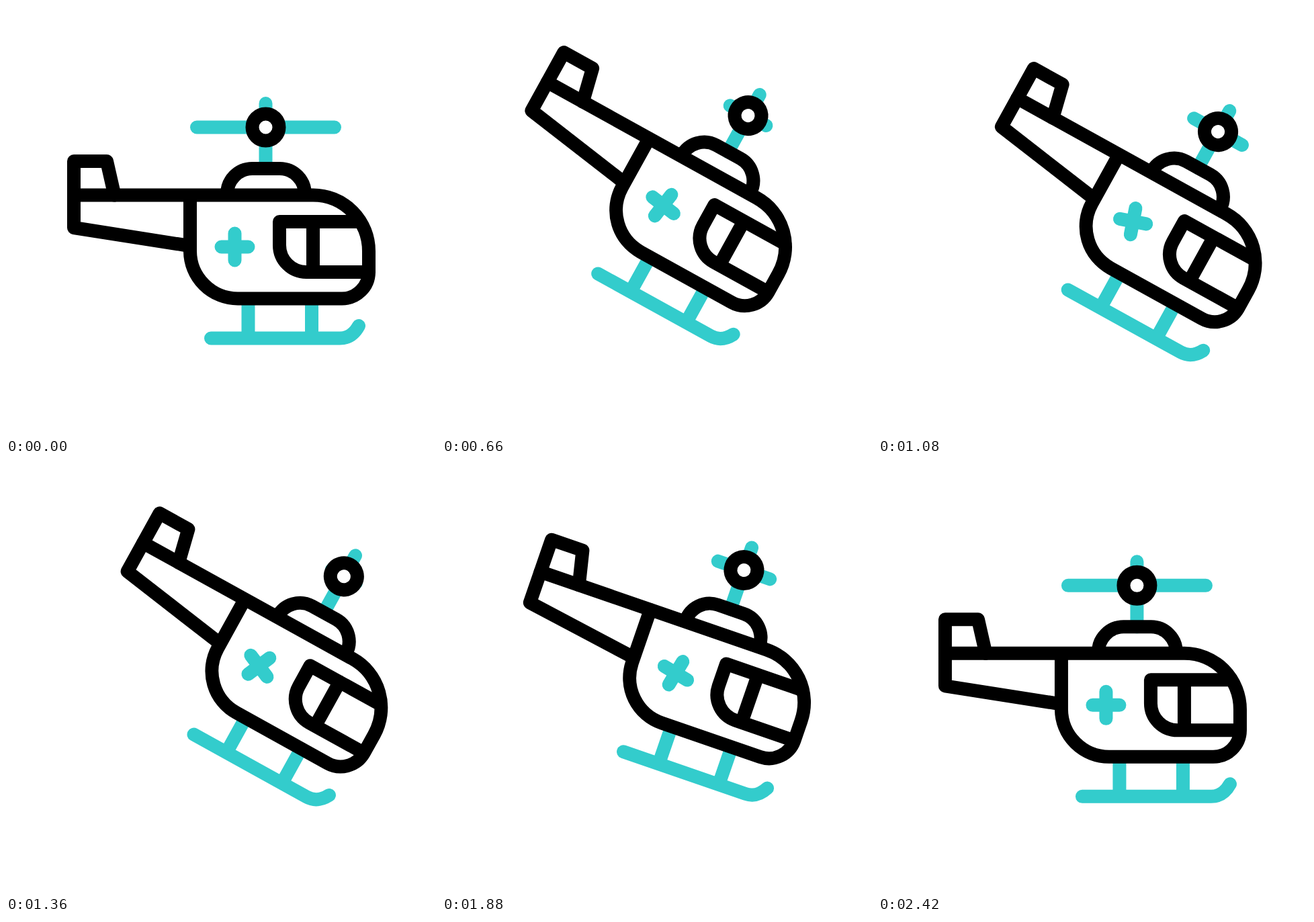
Recreate the animation shown at these times as an HTML page. Size 640 by 640 pixels, loop 2620 ms.

```html
<!DOCTYPE html>
<html>
<head>
<meta charset="utf-8">
<style>
  html, body { margin: 0; width: 100%; height: 100%; overflow: hidden; background: #fff; }
  svg { display: block; width: 100vw; height: 100vh; }
  g { fill: none; stroke-width: 20; stroke-linecap: round; stroke-linejoin: round; }
  .accent { stroke: #3cc; }
  .ink { stroke: #000; }
</style>
</head>
<body>
<svg viewBox="0 0 640 640">
  <g id="craft">
    <g class="accent">
      <path d="M360.5 436V494M455 436V494M305 494.5H497Q515 494.5 525 476M386.5 145V242"/>
      <path id="rotor"/>
      <path id="cross" d="M320.5 358.5h40M340.5 338.5v40"/>
    </g>
    <g class="ink">
      <path d="M457 281.5H101M274 281.5V365A71 71 0 0 0 345 435.5H500A40 40 0 0 0 540 396V365A83 83.5 0 0 0 457 281.5"/>
      <path d="M161.5 281.5L150 231H101V330L270 356.5"/>
      <path d="M329 280A37.5 38 0 0 1 366.5 242H407.5A37.5 38 0 0 1 445 280"/>
      <path d="M527 321H407V356A40 40 0 0 0 447 396H538M457 321V396"/>
      <circle cx="386.5" cy="180.5" r="20" fill="#fff"/>
    </g>
  </g>
</svg>
<script>
const LOOP = 2620, STEP = 20, TILT = 28.95;
const [craft, rotor, cross] = ['craft', 'rotor', 'cross'].map(id => document.getElementById(id));

// Flight path as [time, x, y]; each leg is smooth, with corners where legs meet.
const legs = [
  [[0, 0, 0], [120, -11, -5], [200, -26, -20], [260, -36, -39], [340, -33, -63.5], [430, -18.5, -77],
   [540, -5.5, -73.8], [660, 9.8, -67], [1080, 60.3, -43], [1200, 77.5, -36.5]],
  [[1200, 77.5, -36.5], [1600, 26.5, -102.3]],
  [[1600, 26.5, -102.3], [1640, 22.8, -96.2], [1760, 20, -76], [1930, 21.5, -42],
   [2100, 20.4, -12.7], [2160, 14, -4], [2360, 0, 0], [LOOP, 0, 0]]
];

const ramp = (t, from, to) => Math.min(1, Math.max(0, (t - from) / (to - from)));
const ease = u => u * u * (3 - 2 * u);

function along(points, t, axis) {
  const last = points.length - 1;
  const i = Math.min(last, points.findIndex(p => t < p[0])) - 1;
  const slope = k => {
    const a = points[Math.max(0, k - 1)], b = points[Math.min(last, k + 1)];
    return (b[axis] - a[axis]) / (b[0] - a[0]);
  };
  const a = points[i], b = points[i + 1], span = b[0] - a[0], u = (t - a[0]) / span;
  return a[axis] + (b[axis] - a[axis]) * ease(u)
    + span * u * (1 - u) * (slope(i) * (1 - u) - slope(i + 1) * u);
}

function bladeLength(t) {
  if (t < 2000) return Math.abs(1 - (t % 400) / 200);
  return t < 2158 ? 1 - ramp(t, 2000, 2158) : ramp(t, 2158, 2360);
}

function draw(now) {
  const t = Math.floor(now % LOOP / STEP) * STEP;
  const leg = legs.find(points => t < points[points.length - 1][0]);
  const x = 320 + along(leg, t, 1), y = 320 + along(leg, t, 2);
  const tilt = TILT * (ease(ramp(t, 0, 400)) - ease(ramp(t, 1565, 2365)));
  const blade = 102.5 * bladeLength(t);
  craft.setAttribute('transform', `translate(${x} ${y}) rotate(${tilt}) translate(-320 -320)`);
  rotor.setAttribute('d', `M${386.5 - blade} 180.5H${386.5 + blade}`);
  cross.setAttribute('transform', `rotate(${360 * ramp(t, 0, 2400)} 340.5 358.5)`);
}

let start;
function tick(now) {
  start ??= now;
  draw(now - start);
  requestAnimationFrame(tick);
}
requestAnimationFrame(tick);
</script>
</body>
</html>
```
